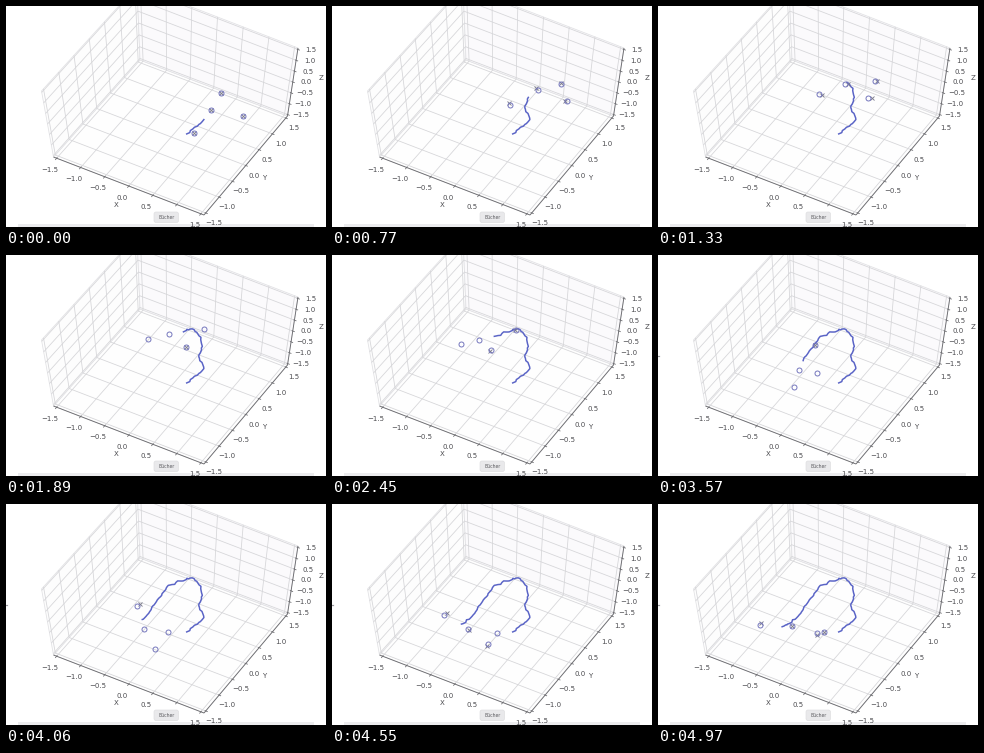
A matplotlib script for the animation above (5320 ms loop, 320 by 221 pixels).

```python
import numpy as np
import matplotlib.pyplot as plt
from matplotlib.animation import FuncAnimation
from matplotlib.patches import FancyBboxPatch, Polygon, Rectangle

W, H, DPI = 320, 221, 64
FRAMES, STEP = 76, 70
PAUSE, LAST = 58, 70  # short hold on the way, last step of the walk
PT = 72 / DPI  # points per pixel

GRID, EDGE, AXIS, TEXT = "#d6d6d9", "#e2e2e5", "#6c6c70", "#4c4c50"
BLUE, RING, CROSS = "#5a64c6", "#7274bc", "#7c7c8c"

fig = plt.figure(figsize=(W / DPI, H / DPI), dpi=DPI, facecolor="white")
ax = fig.add_axes([0, 0, 1, 1])
ax.set(xlim=(0, W), ylim=(H, 0))
ax.axis("off")

# Box corners on screen
left, front, right, back = map(np.array, ((47.5, 151), (198, 209), (281.5, 110), (134, 54)))
left_top, right_top, back_top = map(np.array, ((35.5, 85), (292, 42), (131, -20)))
values = np.linspace(-1.5, 1.5, 7)
ticks = 0.5 + values / 3 * 46 / 48


def mix(a, b, t):
    return a + (b - a) * t


def line(a, b, color, width, z=2):
    ax.plot(*zip(a, b), color=color, lw=width * PT, zorder=z, solid_capstyle="butt")


def label(x, y, s, size=7, color=TEXT, z=4):
    ax.text(x, y, s, fontsize=size * PT, color=color, family="DejaVu Sans",
            ha="center", va="center", zorder=z)


def pane(a, b, c, d, fill):
    """Quad a-b-c-d, with grid lines across both directions."""
    ax.add_patch(Polygon([a, b, c, d], fc=fill, ec=EDGE, lw=0.8 * PT, zorder=1))
    for t in ticks:
        line(mix(a, b, t), mix(d, c, t), GRID, 0.8)
        line(mix(a, d, t), mix(b, c, t), GRID, 0.8)


def axis(a, b, tick, offset, name, name_pos):
    line(a, b, AXIS, 0.9, 3)
    tick = np.array(tick)
    for t, v in zip(ticks, values):
        p = mix(a, b, t)
        line(p - tick * 0.5, p + tick, AXIS, 0.8, 3)
        label(*(p + offset), f"{v:.1f}".replace("-", "\u2212"))
    label(*name_pos, name)


pane(left, front, right, back, "#fefefe")
pane(left, back, back_top, left_top, "#fdfdfd")
pane(back, right, right_top, back_top, "#fbfafc")
axis(left, front, (-1.4, 1.7), (-6.5, 11.5), "X", (110.5, 199))
axis(front, right, (2, 0.8), (8, 10), "Y", (258, 172))
axis(right, right_top, (2, 0.8), (13.5, 0.5), "Z", (315.5, 72))

# Window edges and tooltip
line((319.5, 0), (319.5, H), "#b4b4b8", 1, 5)
ax.add_patch(Rectangle((12, 218), 296, 3, fc="#ececee", zorder=3))
ax.add_patch(FancyBboxPatch((149.5, 207.5), 21.5, 7.5, boxstyle="round,pad=1.5,rounding_size=2",
                            fc="#e9e9eb", ec="#dcdcde", lw=0.6 * PT, zorder=6))
label(160.3, 211.4, "Bücher", 4.6, "#5c5c60", 7)


def spline(t, knots):
    """Smooth curve through knots of (time, value, ...)."""
    knots = np.array(knots, float)
    k, v = knots[:, 0], knots[:, 1:]
    t = np.clip(np.atleast_1d(t), k[0], k[-1])
    slope = np.gradient(v, k, axis=0)
    i = np.clip(np.searchsorted(k, t, "right") - 1, 0, len(k) - 2)
    h = (k[i + 1] - k[i])[:, None]
    u = (t - k[i])[:, None] / h
    return (v[i] * (1 + 2 * u) * (1 - u) ** 2 + v[i + 1] * u * u * (3 - 2 * u)
            + h * u * (1 - u) * (slope[i] * (1 - u) - slope[i + 1] * u))


# Body: one trail point per step, with a slight seeded sway
BODY = [(-9, 181, 128), (-3, 193, 118), (0, 198, 114), (5, 193, 104), (11, 196, 91), (21, 187, 74),
        (27, 178, 76), (35, 163, 82), (44, 153, 94), (58, 136, 116), (70, 124, 123)]
STANCE = [(0, 211, 107), (11, 212, 89), (27, 171, 82), (35, 155, 86),
          (44, 151.5, 100), (58, 145, 125), (70, 140, 125)]
TURN = [(0, 118), (11, 151), (30, 165), (44, 143), (58, 72), (70, 10)]

START = BODY[0][0]
rng = np.random.default_rng(4)
trail_pts = spline(np.arange(START, LAST + 1), BODY)
trail_pts += rng.normal(0, 0.45, trail_pts.shape)


def feet(t):
    """Four feet as two diagonals: a long one that turns, a short one that sways."""
    center = spline(t, STANCE)[0]
    a = np.radians(spline(t, TURN)[0, 0])
    phase = 2 * np.pi * (t - 3) / LAST
    c, s = np.cos(phase), np.sin(phase)
    shift = np.array([-4 - 6 * c, -2 + 2 * c])
    long = np.array([29 * np.cos(a), 22.5 * np.sin(a)])
    short = np.array([11 + 5 * c, 4 + 3 * s])
    return center + np.array([shift + long, -shift - short, shift - long, -shift + short])


# Each foot has no planned foothold for a while: middle and half length of that time
IDLE = np.array([(43, 17), (42, 17), (27, 3), (58, 7)])
STRIDE = 3

trail, = ax.plot([], [], color=BLUE, lw=1.5 * PT, zorder=8, solid_joinstyle="round")
rings, = ax.plot([], [], "o", ms=5 * PT, mfc="none", mec=RING, mew=0.95 * PT, zorder=9)
marks, = ax.plot([], [], "x", ms=4.6 * PT, mec=CROSS, mew=0.9 * PT, zorder=8)
speck, = ax.plot([0, 1], [101, 101], color="#9a9aa0", lw=1.2 * PT, zorder=5)


def update(n):
    t = min(n - (n > PAUSE), LAST)
    trail.set_data(*trail_pts[:t - START + 1].T)
    rings.set_data(*feet(t).T)

    # Footholds stay put for a stride
    planned = feet(min(STRIDE * round(t / STRIDE), LAST))
    marks.set_data(*planned[np.abs(t - IDLE[:, 0]) > IDLE[:, 1]].T)
    speck.set_visible(n >= 50)
    return trail, rings, marks, speck


anim = FuncAnimation(fig, update, frames=FRAMES, interval=STEP, repeat=True, repeat_delay=0)
plt.show()
```
